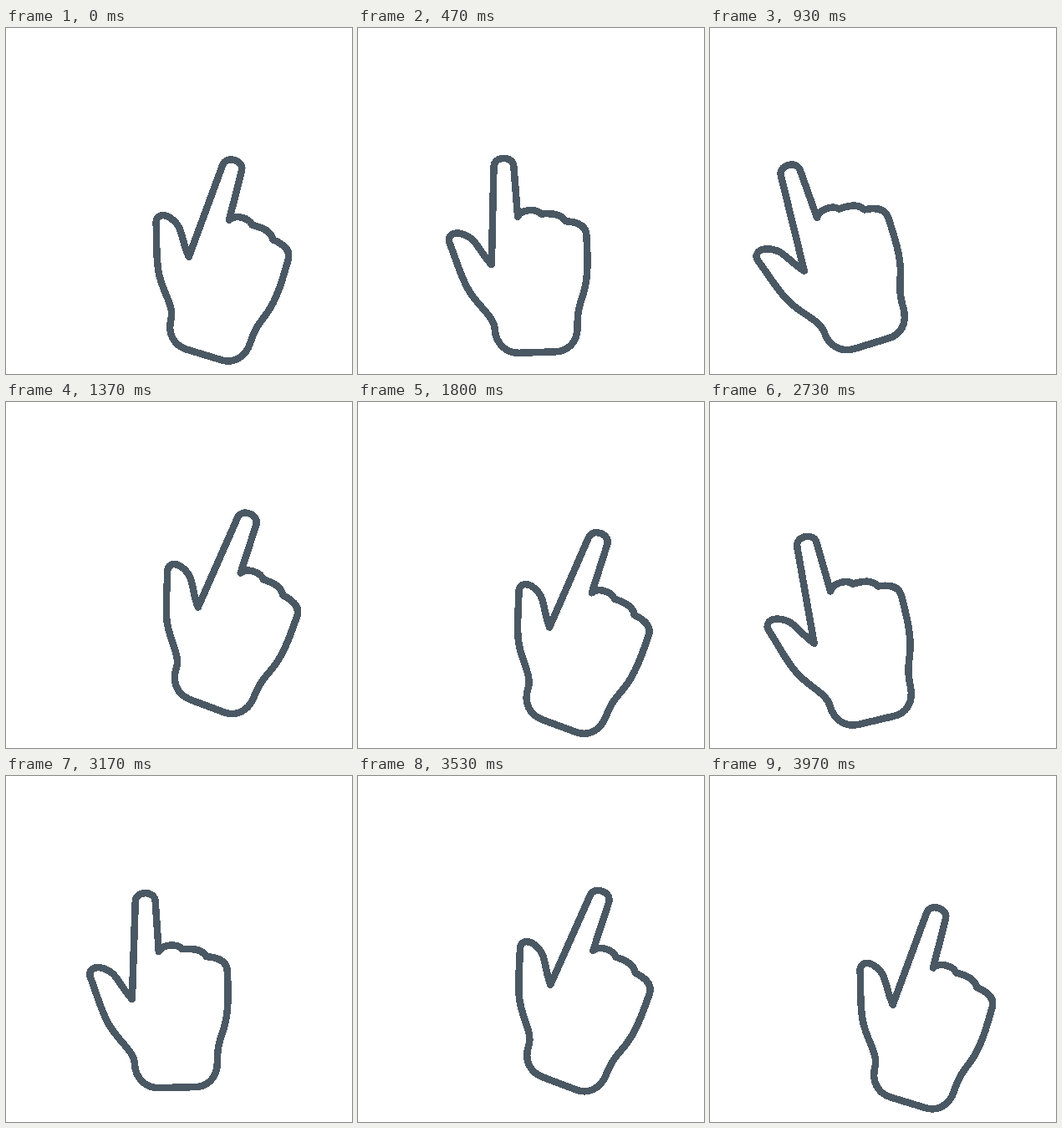
An HTML page that plays this animation: 414 px wide and 414 px high, repeating every 4.01 s.

```html
<!DOCTYPE html>
<html lang="en">
<head>
<meta charset="utf-8">
<title>Swiping hand</title>
<style>
  html, body { margin: 0; width: 100%; height: 100%; overflow: hidden; background: #fff; }
  svg { display: block; width: 100vw; height: 100vh; }
  path {
    fill: none; stroke: #4a5863; stroke-width: 8.5;
    stroke-linejoin: round; shape-rendering: crispEdges;
  }
</style>
</head>
<body>
<svg viewBox="0 0 414 414">
  <!-- The origin of the hand is the fold between thumb and finger -->
  <path id="hand" d="M0 0 L4 -116
    C4 -123 9 -127 16 -127 S28 -123 28 -116
    L32 -57
    C36 -66 54 -67 60 -60
    C73 -61 84 -60 89 -51
    C104 -50 114 -45 114 -33
    C115 -10 116 15 110 34
    C105 50 102 55 102 75
    C102 94 90 105 75 105
    L32 106
    C16 106 4 95 3 77
    C2 62 -15 51 -26 33
    C-36 18 -42 -6 -49 -24
    C-54 -35 -46 -39 -38 -38
    C-17 -33 -18 -20 0 0 Z"/>
</svg>
<script>
  const hand = document.getElementById("hand");
  const FPS = 30, LOOP = 4010, LAST = 119;

  // Steps at which the hand sets off to the left and snaps back
  const swipes = [
    { go: -8, back: 28 },
    { go: 51.3, back: 90 },
    { go: LAST - 8, back: LAST + 28 }
  ];

  const clamp = u => Math.min(1, Math.max(0, u));
  const sine = u => (1 - Math.cos(Math.PI * clamp(u))) / 2;

  // Sharp rise that is halfway after `half` steps and settles slowly
  const snap = (steps, half) => {
    const p = Math.max(0, steps) ** 6;
    return p / (p + half ** 6);
  };

  function pose(step) {
    let shift = 0, turn = 0, lift = 0;
    for (const { go, back } of swipes) {
      const out = sine((step - go) / 39.5), since = step - back;
      shift += out - snap(since, 5.6);
      turn += out - snap(since, 5.25);
      lift += snap(since, 4.6) * (1 - sine((since - 10) / 20));
    }
    return {
      x: 230.5 - 120 * shift,
      y: 272 + 19 * shift - 28 * lift,
      tilt: 22 - 38.5 * turn
    };
  }

  const start = performance.now();

  function draw(now) {
    const time = Math.max(0, now - start) % LOOP;
    const step = Math.min(LAST, Math.floor((time + 4) * FPS / 1000));
    const { x, y, tilt } = pose(step);
    hand.setAttribute("transform", `translate(${x} ${y}) rotate(${tilt})`);
    requestAnimationFrame(draw);
  }
  draw(start);
</script>
</body>
</html>
```
